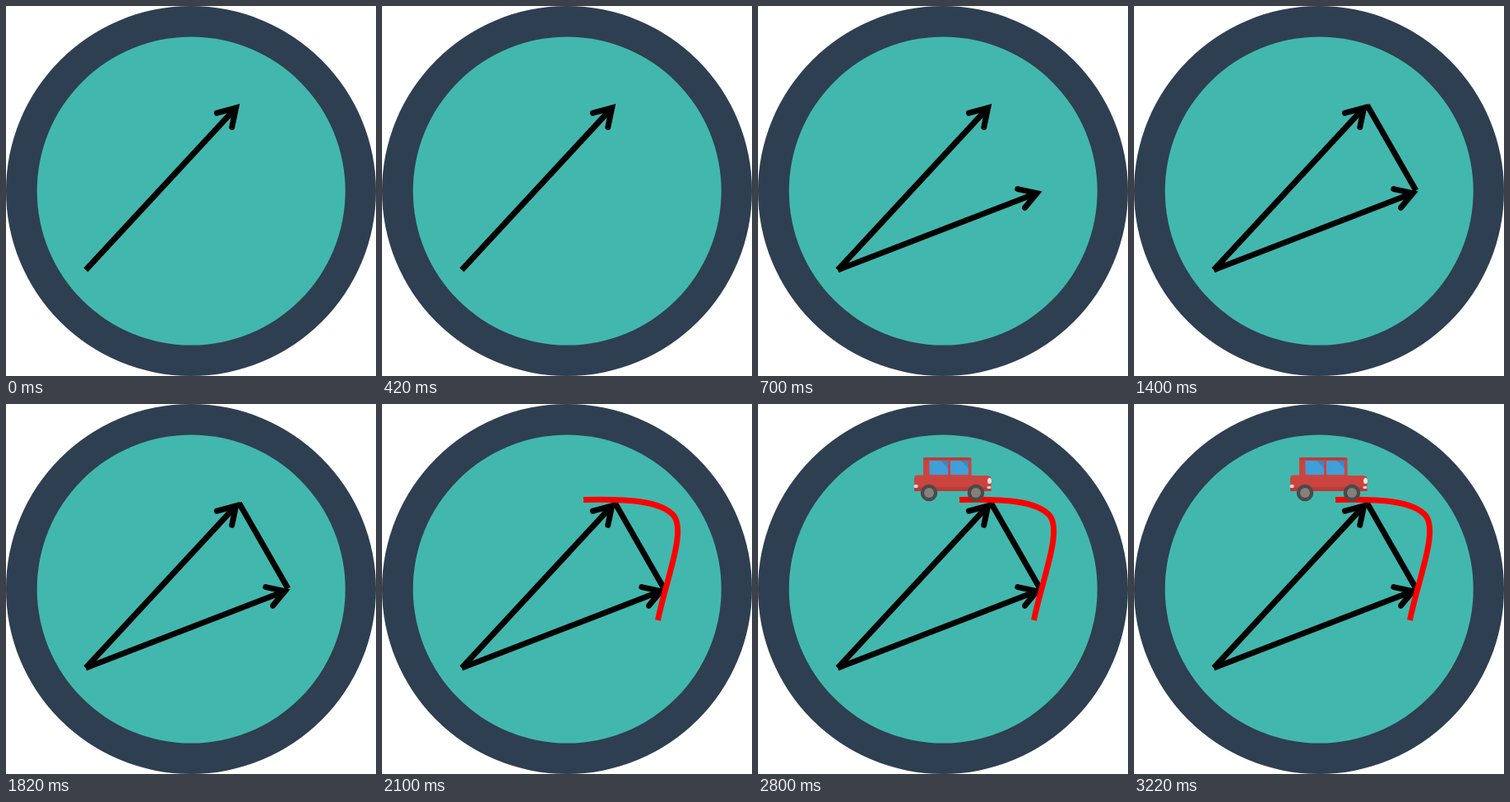
An HTML page for the animation above (3500 ms loop, 450 by 450 pixels).

```html
<!DOCTYPE html>
<html lang="en">
<head>
<meta charset="utf-8">
<title>Vectors along a curve</title>
<style>
  html, body { margin: 0; width: 100%; height: 100%; overflow: hidden; background: #fff; }
  svg { display: block; width: 100vw; height: 100vh; }
  .line { fill: none; stroke: #000; stroke-width: 7; }
  .head { stroke-linecap: round; stroke-miterlimit: 6; }
</style>
</head>
<body>
<svg viewBox="0 0 450 450">
  <circle cx="225" cy="225" r="225" fill="#2e3f52"/>
  <circle cx="225.2" cy="225" r="187.5" fill="#42b7ae"/>

  <g class="line">
    <path d="M97 321L279.5 124"/>
    <path class="head" d="M256.5 130.2L279.7 123.8L274.8 147.2"/>
  </g>
  <g class="line" data-step="1">
    <path d="M97 321L338 228"/>
    <path class="head" d="M315.8 222.6L339.2 227.6L324.6 245.2"/>
  </g>
  <path class="line" data-step="2" d="M283.5 120.5L343 224.5"/>
  <path data-step="3" d="M245 116.5C300 115 340 118 355 136C370 156 345 215 335.5 263"
        fill="none" stroke="#fe0000" stroke-width="7"/>

  <g data-step="4">
    <path d="M203 65H257Q259.500 65 259.500 67.500V87H279Q283.500 87 283.500 91V106H190V90Q190 86.500 194 86.500H201V67Q201 65 203 65Z" fill="#cb4440"/>
    <path d="M201 68V67Q201 65 203 65H257Q259.500 65 259.500 68Z" fill="#b93c39"/>
    <path d="M208.500 69H231V86H208.500ZM234 69H256V86H234Z" fill="#3f9fd8"/>
    <path d="M222 69H231V78ZM247 69H256V78Z" fill="#3889c4"/>
    <rect x="190" y="101" width="93.500" height="5" fill="#b93c39"/>
    <rect x="189.500" y="98" width="5" height="4" rx="1.500" fill="#e6d3cd"/>
    <ellipse cx="281.500" cy="93.500" rx="2.500" ry="3.500" fill="#f1e5dc"/>
    <rect x="278.500" y="100" width="5" height="3" rx="1.500" fill="#e6d3cd"/>
    <g fill="#4b4a49">
      <circle cx="208" cy="108" r="10.300"/>
      <circle cx="265" cy="108" r="10.300"/>
    </g>
    <g fill="#85807b">
      <circle cx="208" cy="108" r="6"/>
      <circle cx="265" cy="108" r="6"/>
    </g>
  </g>
</svg>
<script>
  const STEP = 700, COUNT = 5;
  const parts = document.querySelectorAll("[data-step]");
  const start = performance.now();

  // Each part appears at its step and stays until the loop restarts.
  function draw(ms) {
    const step = Math.floor(ms / STEP) % COUNT;
    for (const part of parts) {
      part.style.display = step >= +part.dataset.step ? "" : "none";
    }
  }

  function tick() {
    draw(performance.now() - start);
    requestAnimationFrame(tick);
  }
  tick();
</script>
</body>
</html>
```
